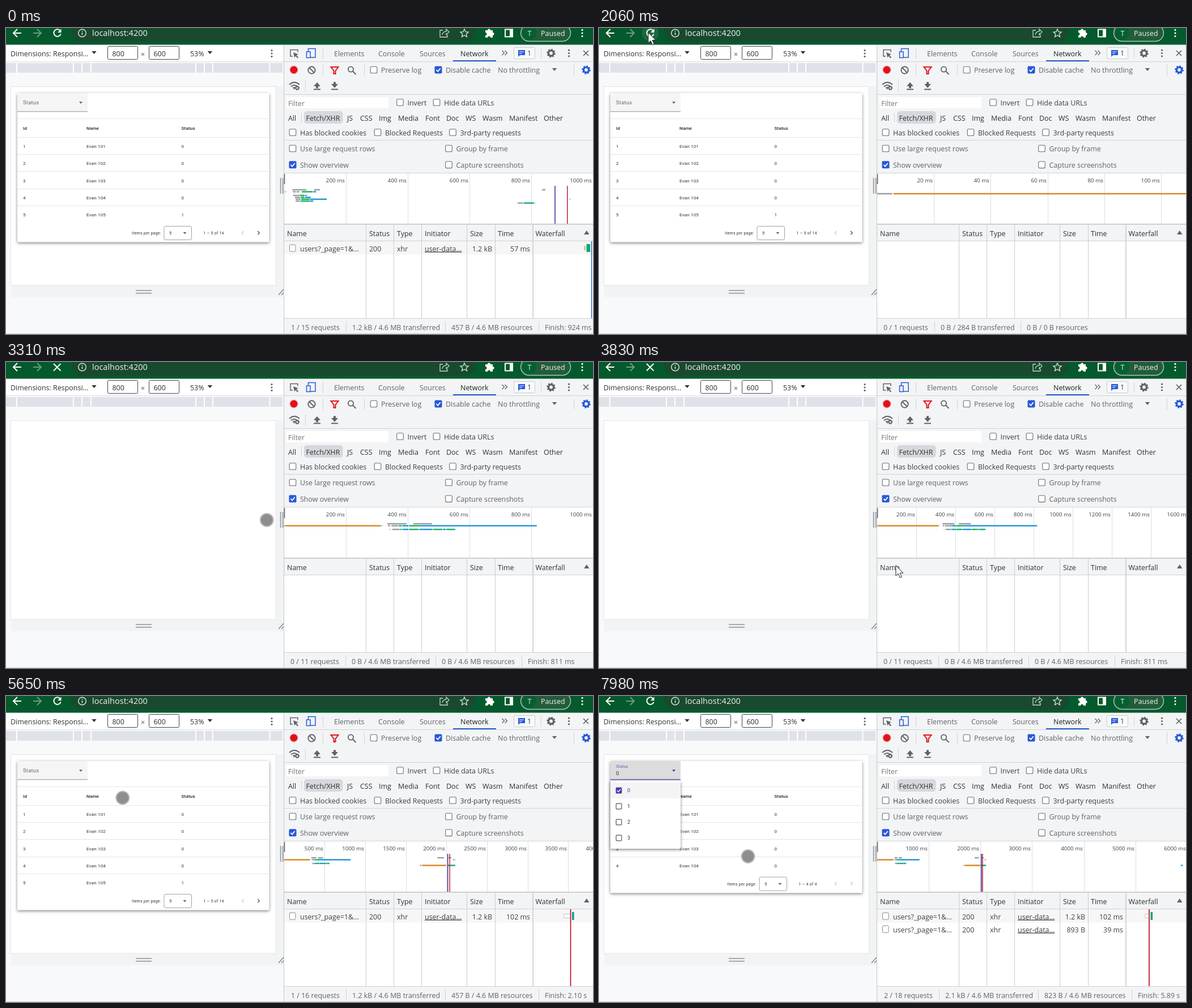
Animation of 1036 by 541 pixels, one loop 8 s. Source, as an HTML page:

```html
<!DOCTYPE html>
<html lang="en">
<head>
<meta charset="utf-8">
<title>Network panel</title>
<style>
html, body { margin: 0; width: 100%; height: 100%; overflow: hidden; background: #f8f9fa; }
svg { display: block; width: 100%; height: 100%; font: 12.45px "Open Sans", sans-serif; fill: #3c4043; white-space: pre; }
.app { font: 8.1px Roboto, sans-serif; letter-spacing: .018em; fill: #333; }
.card { filter: drop-shadow(0 2px 2px rgba(0,0,0,.3)) drop-shadow(0 1px 3px rgba(0,0,0,.2)); }
</style>
</head>
<body>
<svg id="stage" viewBox="0 0 1036 541"><g id="back"></g><g id="live"></g></svg>
<script>
const LOOP = 8000;
const GREY = '#5f6368', BLUE = '#2759d8', PURPLE = '#5033b0', RULE = '#d0d3d6';
const NAV = 1953;      // navigation starts
const CLEAR = 1660;    // request log emptied
const BLANK = 2270, LOADED = 4060;
const OPEN = 6470, PICK = 7450, FILTERED = 7840;

// SVG helpers
const text = (x, y, s, o = '') => `<text x="${x}" y="${y}" ${o}>${s}</text>`;
const rect = (x, y, w, h, fill, o = '') => `<rect x="${x}" y="${y}" width="${w}" height="${h}" fill="${fill}" ${o}/>`;
const line = (d, stroke = GREY, w = 1, fill = 'none') => `<path d="${d}" stroke="${stroke}" stroke-width="${w}" fill="${fill}"/>`;
const shape = (d, fill = GREY) => `<path d="${d}" fill="${fill}"/>`;
const circle = (x, y, r, fill, o = '') => `<circle cx="${x}" cy="${y}" r="${r}" fill="${fill}" ${o}/>`;
const vline = (x, y0, y1, c = RULE, w = 1) => line(`M${x} ${y0}V${y1}`, c, w);
const hline = (y, x0, x1, c = RULE, w = 1) => line(`M${x0} ${y}H${x1}`, c, w);
const down = (x, y, r, c) => shape(`M${x - r} ${y}h${2 * r}l${-r} ${r * 1.2}z`, c);
const dots = (x, y, c, gap = 5.3) => [-gap, 0, gap].map(d => circle(x, y + d, 1.6, c)).join('');
const gear = (x, y, c, k = 1) => `<g transform="translate(${x} ${y}) scale(${k})">` +
  circle(0, 0, 4.6, 'none', `stroke="${c}" stroke-width="3.4"`) +
  circle(0, 0, 6.7, 'none', `stroke="${c}" stroke-width="2.2" stroke-dasharray="2.63"`) + '</g>';
const check = (x, y, on) => on
  ? rect(x - 6.5, y - 6.5, 13, 13, BLUE, 'rx="2"') + line(`M${x - 3.5} ${y}l2.6 2.8 4.6 -5.6`, '#fff', 1.8)
  : rect(x - 5.8, y - 5.8, 11.6, 11.6, '#fff', 'rx="2" stroke="#6b6e72" stroke-width="1.1"');
const option = (x, y, label, on, fill = '') => check(x, y, on) + text(x + 13, y + 5, label, fill);

function lerpKeys(keys, t) {
  const i = keys.findIndex(k => k[0] > t);
  if (i < 0) return keys[keys.length - 1].slice(1);
  if (i === 0) return keys[0].slice(1);
  const a = keys[i - 1], b = keys[i], f = (t - a[0]) / (b[0] - a[0]);
  return a.slice(1).map((v, j) => v + (b[j + 1] - v) * f);
}

function browserBar() {
  const W = '#fff', pale = '#d5e2da';
  return rect(0, 0, 1036, 30, '#04592d') +
    line('M27 9H13M20 2l-7 7 7 7', W, 2) + line('M48 9h14M55 2l7 7-7 7', '#6d9c82', 2) +
    rect(115, -12, 714, 36, '#19492e', 'rx="18"') +
    circle(134.5, 9, 6.8, 'none', `stroke="${pale}" stroke-width="1.5"`) + line('M134.5 8v4.5M134.5 5v1.6', pale, 1.6) +
    text(152, 14, 'localhost:4200', 'font-size="14.5" fill="#f1f5f2"') +
    line('M771 4h-5v12h13v-4M770 12c1-5 4-6 7-6V2l5 5-5 5V9', '#c5d6cc', 1.3) +
    line('M809 2l2.1 4.7 5 .5-3.8 3.4 1.1 5-4.4-2.6-4.4 2.6 1.1-5-3.8-3.4 5-.5z', pale, 1.4) +
    shape('M846 4h4a2.5 2.5 0 0 1 5 0h4v4a2.5 2.5 0 0 1 0 5v4h-4a2.5 2.5 0 0 0-5 0h-4v-4a2.5 2.5 0 0 0 0-5z', W) +
    rect(881, 2.5, 13, 13, 'none', 'stroke="#fff" stroke-width="2"') + rect(889, 2, 5.5, 14, W) +
    rect(908.5, -6, 88, 29.5, '#235c3b', 'rx="14.7" stroke="#a9cbb7" stroke-width="1.4"') +
    circle(924, 9, 12, '#056030') + text(924, 13.5, 'T', 'text-anchor="middle" fill="#e4efe8"') +
    text(944, 13.5, 'Paused', 'fill="#f1f5f2"') + dots(1017, 9, W, 5.6);
}

function deviceFrame() {
  const ink = 'fill="#303134"', grip = '#9b9ea2';
  let s = rect(0, 30, 490, 30, '#fff') + text(8, 49.5, 'Dimensions: Responsi…', ink) + down(155.5, 41, 4.2, '#333') +
    [[179.5, 800], [252.5, 600]].map(([x, v]) =>
      rect(x, 32.5, 53, 23, '#fff', 'rx="2" stroke="#444"') + text(x + 8, 49.5, v, ink)).join('') +
    text(238, 50.5, '×', 'fill="#555"') + text(325, 49.5, '53%', ink) + down(360, 41, 4.2, '#333') + dots(469, 45, GREY) +
    hline(59.5, 0, 490, '#dadce0') + rect(0, 62, 488, 17, '#dfe2e8');
  for (const x of [19, 119, 134, 150, 335, 350, 365, 465.5]) s += vline(x, 62, 79, '#fff', 2);
  return s + rect(9, 103, 481, 373, '#f1f3f4') + rect(8.5, 103.5, 468, 351.5, '#fff', 'stroke="#e2e4e6"') +
    line('M229 464.2h28M229 468.8h28', grip, 1.8) + line('M484.6 265v28M488.6 265v28', grip, 1.8) +
    line('M481 472l9-10M486 472l4-4', '#888', 1.5);
}

function devtools() {
  const dim = `fill="${GREY}"`;
  let s = rect(491, 30, 545, 511, '#f3f4f5') + hline(59.5, 491, 1036) + hline(117.5, 491, 1036) + hline(198.5, 491, 1036) +
    vline(490.5, 30, 541, '#c4c7ca') + hline(30, 0, 1036, '#e6e9ea');
  // tab strip
  s += line('M506 50h-4V38.5h13v4', GREY, 1.5) + shape('M507 43l9 3.6-3.4 1.5 3.4 4-1.6 1.3-3.3-4-1.8 3z') +
    rect(533.5, 36.5, 12.5, 15.5, 'none', `stroke="${BLUE}" stroke-width="1.5"`) +
    rect(530.5, 42, 6.5, 10.5, '#f3f4f5', `stroke="${BLUE}" stroke-width="1.5"`) +
    vline(559.5, 36, 54) + text(579, 49.5, 'Elements', dim) + text(657, 49.5, 'Console', dim) + text(730, 49.5, 'Sources', dim) +
    text(802, 49.5, 'Network', 'fill="#202124"') + hline(58, 789, 865, BLUE, 2) +
    line('M875.5 40l4 4-4 4M880.5 40l4 4-4 4', GREY, 1.3) +
    rect(896.5, 34.5, 37, 20, '#f8f9fa', 'rx="2" stroke="#c9ccd0"') + shape('M904 39h12v9h-9l-3 3z', BLUE) +
    line('M906 42h8M906 45h5', '#fff') + text(920, 49, '1') + vline(944.5, 36, 54) +
    gear(962, 44.5, GREY) + dots(993.5, 44.5, GREY) + line('M1019 40l9 9M1028 40l-9 9', GREY, 1.7);
  // toolbar
  s += circle(508, 74, 7.8, '#f6b9bd') + circle(508, 74, 6.5, '#e3101c') +
    circle(539.5, 74.5, 6.2, 'none', `stroke="${GREY}" stroke-width="1.9"`) + line('M535 70l9 9', GREY, 1.9) + vline(559.5, 65, 84) +
    line('M573.5 69h13l-5 6.5v5.5h-3v-5.5z', '#e3101c', 2) +
    circle(608.5, 73, 4.6, 'none', `stroke="${GREY}" stroke-width="1.8"`) + line('M612 76.5l5.5 5.5', GREY, 2) + vline(632.5, 65, 84) +
    option(649, 74, 'Preserve log', 0, dim) + option(763, 74, 'Disable cache', 1, dim) + text(868, 79, 'No throttling', dim) +
    down(968, 71, 4.2, GREY) + vline(1002.5, 65, 84) + gear(1024, 74, BLUE) +
    line('M500 100q9-8 18 0M503 103.5q6-5 11 0', GREY, 1.9) + shape('M505.5 105l5-1-1.5 5z') + gear(514, 106, GREY, .55) +
    vline(528.5, 93, 112) + shape('M543 103l6-7 6 7h-4v3.5h-4v-3.5zM543 107.5h12v2h-12z') +
    shape('M574 99h4v-3.5h4v3.5h4l-6 7zM574 107.5h12v2h-12z');
  // filters
  s += rect(495, 122, 180, 20, '#fff') + text(498, 137.5, 'Filter', 'fill="#777"') +
    option(695.5, 131.5, 'Invert', 0) + option(760, 131.5, 'Hide data URLs', 0) +
    rect(526, 147, 68.5, 22, '#d6d8dd', 'rx="5"') + vline(521.5, 150, 167);
  const kinds = [[498, 'All'], [529.5, 'Fetch/XHR'], [602, 'JS'], [625, 'CSS'], [658, 'Img'], [692, 'Media'], [740, 'Font'],
    [777, 'Doc'], [811, 'WS'], [841, 'Wasm'], [888, 'Manifest'], [949, 'Other']];
  for (const [x, k] of kinds) s += text(x, 163.5, k, 'fill="#303134"');
  s += option(506, 184.5, 'Has blocked cookies', 0) + option(656, 184.5, 'Blocked Requests', 0) + option(788.5, 184.5, '3rd-party requests', 0) +
    option(506, 213, 'Use large request rows', 0, dim) + option(781.5, 213, 'Group by frame', 0, dim) +
    option(506, 241.8, 'Show overview', 1, dim) + option(781.5, 241.8, 'Capture screenshots', 0, dim);
  // request table
  s += rect(491, 257, 545, 89, '#fff') + hline(256.5, 491, 1036) + hline(346.8, 491, 1036, '#bfc2c6', 1.5) +
    rect(491, 377, 545, 136, '#fff') + hline(376.5, 491, 1036) + hline(513.5, 491, 1036);
  const heads = [[496, 'Name'], [641, 'Status'], [690, 'Type'], [739, 'Initiator'], [819, 'Size'], [868, 'Time'], [934.5, 'Waterfall']];
  for (const [x, h] of heads) s += text(x, 367.5, h, 'fill="#303134"');
  return s + shape('M1020 365h9.5l-4.7-7z') + hline(540.5, 0, 1036);
}

// Overview bars: row, colour, start ms, end ms
const SLATE = '#999b9e', LEAF = '#14b055', SKY = '#1c93dc', AMBER = '#d9841c', PALE = '#a9d3ee';
const oldBars = [
  [286, SLATE, 26, 72], [286, SLATE, 97, 116], [286, SLATE, 835, 846],
  [289.5, PALE, 0, 7], [289.5, SLATE, 28, 38], [289.5, SLATE, 40, 49], [289.5, LEAF, 57, 92], [289.5, SKY, 94, 103],
  [296, SLATE, 29, 50], [296, LEAF, 51, 66], [296, SKY, 68, 73],
  [299.5, SLATE, 35, 51], [299.5, LEAF, 53, 66], [299.5, SKY, 68, 86],
  [302.7, SLATE, 37, 53], [302.7, LEAF, 55, 83], [302.7, SKY, 84, 138], [302.7, PALE, 923, 928],
  [306, SLATE, 37, 51], [306, LEAF, 53, 83], [306, SKY, 84, 94],
  [309.5, PALE, 754, 758], [309.5, SLATE, 758, 774], [309.5, LEAF, 776, 809], [309.5, PALE, 811, 814]];
const newBars = [
  [289.5, SLATE, 0, 5.3], [289.5, AMBER, 5.7, 313], [289.5, PALE, 314, 319],
  [286, SLATE, 334, 396], [286, SLATE, 418, 479], [286, SLATE, 1885, 1966], [286, SLATE, 2024, 2056],
  [289.5, SLATE, 336, 343], [289.5, SLATE, 347, 369], [289.5, LEAF, 371, 380], [289.5, SKY, 382, 402],
  [289.5, LEAF, 404, 439], [289.5, SKY, 439, 818], [289.5, SLATE, 2078, 2092], [289.5, PALE, 2096, 2110],
  [296, PALE, 341, 345], [296, SLATE, 350, 374], [296, LEAF, 376, 381], [296, SKY, 383, 402], [296, LEAF, 404, 435],
  [296, SKY, 437, 481], [296, LEAF, 483, 512], [296, SKY, 514, 523], [296, LEAF, 525, 550], [296, SKY, 550, 554],
  [299.5, SLATE, 1670, 1688], [299.5, AMBER, 1697, 1993], [299.5, LEAF, 2011, 2092], [299.5, SKY, 2092, 2106],
  [299.5, PALE, 5860, 5878], [299.5, SKY, 5878, 5910]];

const spanKeys = [[0, 1000], [CLEAR, 1000], [CLEAR, 100], [NAV, 100], [2060, 107.6], [2700, 747], [3200, 1000], [3570, 1000],
  [4070, 2110], [4370, 2446], [5240, 2446], [5240, 3800], [FILTERED, 3800], [FILTERED, 5970], [LOOP, 5970]];

function overview(t, span) {
  const k = 545 / span, at = ms => 491 + ms * k;
  const mag = 10 ** Math.floor(Math.log10(64 / k));
  const step = [1, 2, 5, 10].map(n => n * mag).find(v => v * k >= 64);
  let s = '';
  for (let ms = step; at(ms) < 1080; ms += step) {
    const x = Math.floor(at(ms)) + .5;
    s += vline(x, 257, 346, '#dcdee0') + text(x - 2.5, 273, ms + ' ms', 'text-anchor="end" font-size="9.8"');
  }
  s += vline(491.5, 258, 276, '#666', 1.6);
  const first = t < CLEAR, bars = first ? oldBars : t < NAV ? [] : newBars;
  const alone = !first && span < 334;
  for (const [y, c, a, b] of bars)
    if (a < span) s += rect(at(a), (alone ? 293 : y) - 1.2, Math.max(1, (Math.min(b, span) - a) * k), 2.4, c);
  const [dom, load] = first ? [877, 917] : [2012, 2037];
  if (load < span) s += vline(at(dom), 279, 346, '#2c1a8e', 1.4) + vline(at(load), 279, 346, '#b3122c', 1.4);
  return s;
}

function request(y, size, time) {
  return rect(500.5, y - 11.3, 10.5, 12, '#fff', 'rx="1.5" stroke="#85888c"') + text(519, y, 'users?_page=1&amp;…') +
    text(641, y, '200') + text(690, y, 'xhr') + text(739, y, 'user-data…', 'text-decoration="underline"') +
    text(858, y, size, 'text-anchor="end"') + text(925, y, time, 'text-anchor="end"');
}

function requests(t, hover) {
  let s = '';
  const first = t < CLEAR, done = t >= 4070, late = t >= FILTERED;
  if (first || done) {
    s += rect(491, 377, 545, 23.5, hover ? '#f0f3fb' : '#f6f6f6') + request(394.5, '1.2 kB', first ? '57 ms' : '102 ms');
    if (first) s += rect(1020, 385, 3, 8, '#c3c5c8') + rect(1024.5, 382, 6.5, 14, '#17a862') + vline(1033.5, 377, 513, '#2a62c9', 1.5);
    else if (t < 5240) s += rect(1017.5, 385.5, 17, 7, '#fff', 'stroke="#c3c5c8"') + vline(1035, 377, 513, '#2446b8', 2);
    else {
      const x = late ? 971 : 996.5, w = late ? 7 : 12;
      s += rect(x - w, 385.5, w, 7, '#fff', 'stroke="#c3c5c8"') + rect(x + 2.5, 382, 3.6, 14, '#13a08a') + vline(x, 377, 513, '#c01a2c', 1.8);
    }
  }
  if (late) s += request(417.5, '893 B', '39 ms');
  for (const x of [635.5, 684.5, 733.5, 813.5, 863.5, 930]) s += vline(x, 348, 513, '#c9ccd0', x === 930 ? 1.6 : 1);
  return s;
}

function summary(t) {
  const full = [503, 611, 786, 951];
  const [xs, words] =
    t < CLEAR ? [full, ['1 / 15 requests', '1.2 kB / 4.6 MB transferred', '457 B / 4.6 MB resources', 'Finish: 924 ms']] :
    t < BLANK ? [[502, 603, 755], ['0 / 1 requests', '0 B / 284 B transferred', '0 B / 0 B resources']] :
    t < 4070 ? [[502, 610, 769, 921], ['0 / 11 requests', '0 B / 4.6 MB transferred', '0 B / 4.6 MB resources', 'Finish: 811 ms']] :
    t < FILTERED ? [full, [`1 / ${t < 4830 ? 15 : 16} requests`, '1.2 kB / 4.6 MB transferred', '457 B / 4.6 MB resources', 'Finish: 2.10 s']] :
    [full, ['2 / 18 requests', '2.1 kB / 4.6 MB transferred', '823 B / 4.6 MB resources', 'Finish: 5.89 s']];
  return words.map((w, i) => (i ? vline(xs[i] - 10.5, 519, 538) : '') + text(xs[i], 533.5, w, `fill="${GREY}"`)).join('');
}

function dropdown(t, f) {
  let s = `<g class="card" opacity="${f}" transform="translate(0 ${30 * (1 - f)}) scale(1 ${.8 + .2 * f})">` +
    rect(20, 150, 124, 120, '#fff', 'rx="1.5"') + rect(20, 153, 124, 28, '#f4f4f4');
  for (let i = 0; i < 4; i++) {
    const y = 167 + 28 * i, on = !i && t >= PICK;
    s += rect(30.2, y - 4.8, 9.6, 9.6, on ? PURPLE : 'none', `rx="1" stroke="${on ? PURPLE : '#555'}" stroke-width="1.2"`) +
      (on ? line(`M32 ${y}l2.3 2.4 4-4.8`, '#fff', 1.4) : '') + text(50, y + 3.2, i, `font-size="9" fill="${on ? PURPLE : '#333'}"`);
  }
  return s + '</g>';
}

function app(t) {
  if (t >= BLANK && t < LOADED) return '';
  const few = t >= FILTERED, rows = few ? 4 : 5, gap = 30.35;
  const dx = few ? 4 : 0, dy = few ? -gap : 0;
  const f = Math.max(0, Math.min(1, (t - OPEN) / 130)), open = f > 0;
  let s = `<g class="card">${rect(20, 115, 444.5, 263.5 + dy, '#fff', 'rx="1.5"')}</g>`;
  s += rect(20, 115, 124, 33, open ? '#dcdcdc' : '#f5f5f5', 'rx="1.5"') + hline(147.8, 20, 144, open ? PURPLE : '#8f8f8f', open ? 1.3 : 1) +
    text(30, 135 - 7.7 * f, 'Status', `font-size="${9.3 - 2.3 * f}" letter-spacing=".031em" fill="${open ? '#6a5aa8' : '#666'}"`) +
    down(132, 130.3, 3, open ? PURPLE : '#666');
  if (t >= PICK) s += text(30, 139.5, '0', 'font-size="9.3"');
  s += hline(160.5, 20, 464.5, '#e6e6e6');
  for (const [x, h] of [[30, 'Id'], [142, 'Name'], [309.5, 'Status']]) s += text(x, 180, h, 'font-weight="500" fill="#222"');
  for (let i = 0; i < rows; i++) {
    const y = 212 + gap * i;
    s += hline(Math.floor(193 + gap * i) + .5, 20, 464.5, '#e6e6e6') +
      text(30, y, i + 1) + text(142, y, 'Evan ' + (101 + i)) + text(309.5, y, i < 4 ? 0 : 1);
  }
  const small = 'font-size="7" style="letter-spacing:.033em"';
  s += `<g transform="translate(${dx} ${dy})">` + text(222, 365, 'Items per page:', small) +
    rect(279, 350.5, 48.5, 24, '#fff', 'rx="2.5" stroke="#a2a2a2"') + text(288, 365, '5', 'font-size="7.6"') + down(315.5, 361, 3, '#666') +
    text(348.5, 365, `1 – ${rows} of ${few ? 4 : 14}`, small) + '</g>';
  s += line(`M419.5 ${359 + dy}l-3 3.2 3 3.2`, '#c4c4c4', 1.1) + line(`M444.2 ${359 + dy}l3 3.2-3 3.2`, few ? '#c4c4c4' : '#444', 1.2);
  return `<g class="app">${s}${open ? dropdown(t, f) : ''}</g>`;
}

const path = [[180, 811, 488], [920, 64, 8], [990, 66, 8], [1250, 87, 8], [2750, 87, 8], [3310, 460, 279], [3500, 512, 335],
  [4000, 530, 372], [4370, 541, 387], [4560, 541, 389.5], [5030, 541, 389.5], [5650, 206, 180], [5780, 183, 177],
  [5850, 181, 176], [6120, 127, 130], [6560, 127, 130], [6920, 63, 171], [7600, 63, 171], [7980, 263, 283.5]];

function pointer(t, x, y) {
  if (t < 180) return '';
  if (x > 9 && x < 476 && y > 103 && y < 455)
    return circle(x, y, 11.4, '#858585', 'fill-opacity=".93" stroke="#b9b9b9" stroke-width="2"');
  return `<g transform="translate(${x} ${y})">${line('M0 0V18.5L4.2 14.6 7.3 21.8 10.3 20.5 7.2 13.6H13Z', '#222', 1, '#fff')}</g>`;
}

function reload(t) {
  if (t >= BLANK && t < 4010) return line('M84 3l12.5 12.5M96.5 3L84 15.5', '#fff', 2);
  return (t >= 1080 && t < BLANK ? circle(90.5, 9, 15, '#34775080') : '') +
    line('M95.5 4.5A6.3 6.3 0 1 0 96.7 10.5', '#fff', 2) + shape('M97.5 1.5v6.5h-6.5z', '#fff');
}

function scene(t) {
  const [x, y] = lerpKeys(path, t), [span] = lerpKeys(spanKeys, t);
  const hover = t >= 180 && x > 491 && y > 377 && y < 400;
  return reload(t) + app(t) + overview(t, span) + requests(t, hover) + summary(t) + pointer(t, x, y);
}

const live = document.getElementById('live');
document.getElementById('back').innerHTML = browserBar() + deviceFrame() + devtools();
let shown = '';
function tick() {
  const next = scene(performance.now() % LOOP);
  if (next !== shown) live.innerHTML = shown = next;
  requestAnimationFrame(tick);
}
tick();
</script>
</body>
</html>
```
